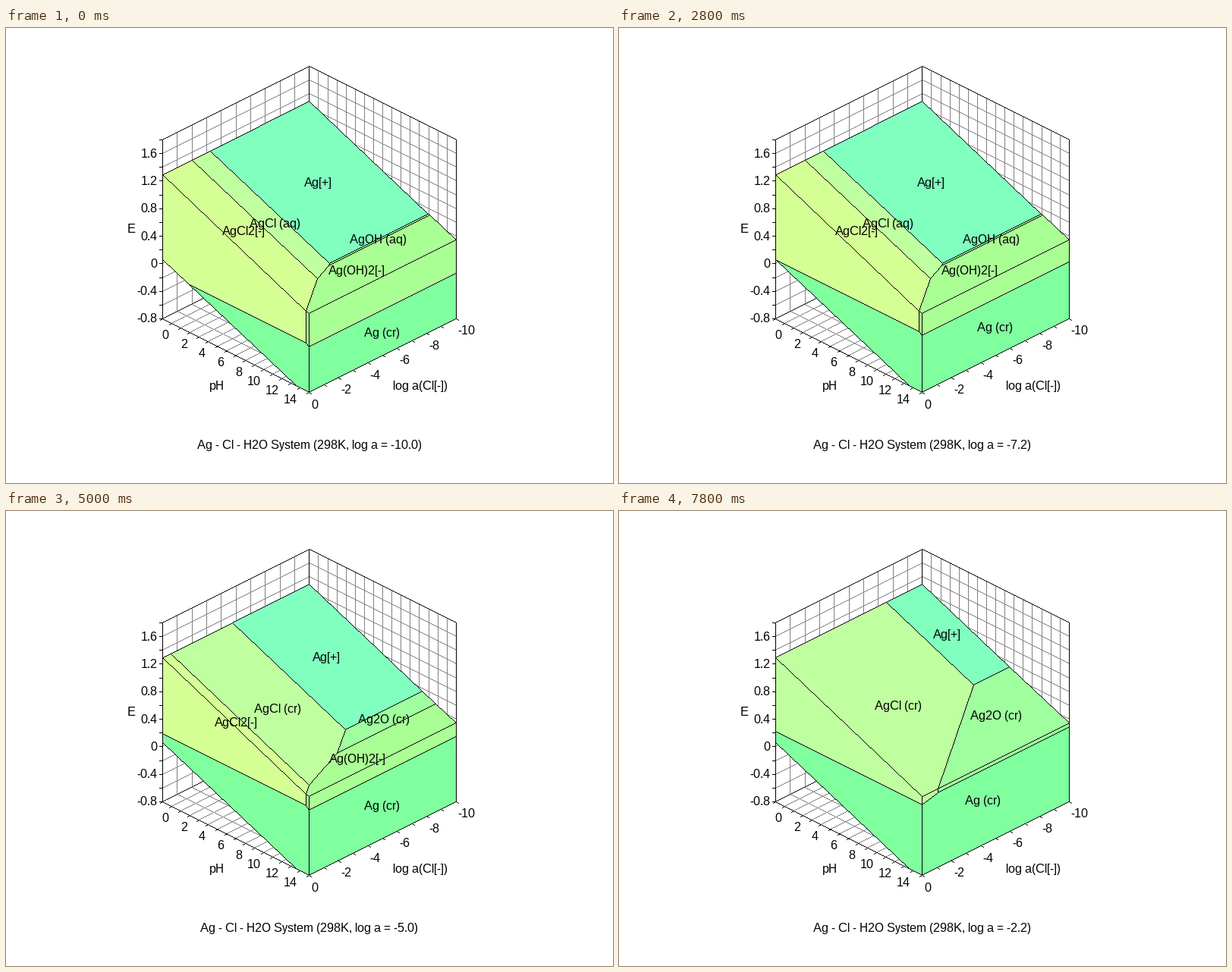
A matplotlib script for the animation above (8000 ms loop, 800x600 px).

```python
import matplotlib.pyplot as plt
import numpy as np
from matplotlib.animation import FuncAnimation
from matplotlib.collections import PolyCollection

plt.rcParams.update({
    "font.family": "Liberation Sans",
    "font.size": 12,
    "text.hinting": "native",
    "text.hinting_factor": 1,
})

W, H, DPI = 800, 600, 96
FRAMES, INTERVAL = 40, 200
NERNST = 0.05916
PH = (-1, 15)
CL = (-10, 0)
E = (-0.8, 1.8)
E_AG = 0.7996

# name: (colour, constant, weight of log a, of pH, of log Cl, of E)
# Each row gives log a(Ag+) in equilibrium with the species; the lowest wins.
SPECIES = {
    "Ag (cr)": ("#80ff9f", -E_AG / NERNST, 0, 0, 0, 1 / NERNST),
    "Ag[+]": ("#80ffbf", 0, 1, 0, 0, 0),
    "AgCl (aq)": ("#bfff9f", -3.27, 1, 0, -1, 0),
    "AgCl (cr)": ("#bfff9f", -9.75, 0, 0, -1, 0),
    "AgCl2[-]": ("#d4ff94", -5.30, 1, 0, -2, 0),
    "AgOH (aq)": ("#95ff95", 11.96, 1, -1, 0, 0),
    "Ag2O (cr)": ("#9fff9f", 6.30, 0, -1, 0, 0),
    "Ag(OH)2[-]": ("#aaff94", 24.05, 1, -2, 0, 0),
}


def project(ph, cl, e):
    u, v = (ph - PH[0]) / 16, -cl / 10
    return 206 + 193.4 * (u + v), 383 + 97 * (u - v) - 90.8 * (e - E[0])


def oxygen(ph):
    return 1.229 - NERNST * ph


def hydrogen(ph):
    return -NERNST * ph


def water_faces():
    a, b = PH
    top = [(a, 0, oxygen(a)), (a, -10, oxygen(a)),
           (b, -10, oxygen(b)), (b, 0, oxygen(b))]
    left = [(a, 0, oxygen(a)), (b, 0, oxygen(b)), (b, 0, E[0]),
            (-E[0] / NERNST, 0, E[0]), (a, 0, hydrogen(a))]
    right = [(b, 0, oxygen(b)), (b, -10, oxygen(b)), (b, -10, E[0]), (b, 0, E[0])]
    return [np.array(f, float) for f in (top, right, left)]


FACES = water_faces()


def clip(poly, const, normal):
    """Keep the part of poly where const + normal . p >= 0."""
    out = []
    for p, q in zip(poly, np.roll(poly, -1, axis=0)):
        dp, dq = const + normal @ p, const + normal @ q
        if dp >= 0:
            out.append(p)
        if dp * dq < 0:
            out.append(p + (q - p) * dp / (dp - dq))
    return np.array(out)


def region(face, name, log_a):
    def plane(key):
        _, const, k, *normal = SPECIES[key]
        return const + k * log_a, np.array(normal, float)

    c0, n0 = plane(name)
    poly = face
    for other in SPECIES:
        if other != name:
            c, n = plane(other)
            poly = clip(poly, c - c0, n - n0)
            if len(poly) < 3:
                return None
    return np.column_stack(project(*poly.T))


def snap(v):
    return np.floor(np.asarray(v) + 0.499)


def pixels(segments):
    """Whole-pixel points of one-pixel-wide, hard-edged lines."""
    dots = []
    for p, q in segments:
        p, q = snap(p), snap(q)
        n = int(abs(q - p).max())
        dots.append(snap(np.linspace(p, q, n + 1)))
    # stay off the pixel borders so that rounding is stable
    return (np.concatenate(dots) + (-0.25, 0.25)).T


fig = plt.figure(figsize=(W / DPI, H / DPI), dpi=DPI, facecolor="white")
ax = fig.add_axes([0, 0, 1, 1])
ax.set_xlim(-0.5, W - 0.5)
ax.set_ylim(H - 0.5, -0.5)
ax.axis("off")
ax.set_autoscale_on(False)


def lines(segments, color, z):
    ax.plot(*pixels(segments), ",", color=color, zorder=z)


def label(x, y, text, ha="center"):
    return ax.text(x, y, text, ha=ha, va="baseline", color="black", zorder=5)


def seg(p, q):
    return [project(*p), project(*q)]


def draw_box():
    a, b = PH
    lo, hi = E
    phs, cls, es = range(a, b + 1), range(CL[0], 1), np.arange(lo, hi + 0.01, 0.2)
    grid = [seg((p, -10, lo), (p, -10, hi)) for p in phs]
    grid += [seg((p, 0, lo), (p, -10, lo)) for p in phs]
    grid += [seg((a, c, lo), (a, c, hi)) for c in cls]
    grid += [seg((a, c, lo), (b, c, lo)) for c in cls]
    grid += [seg((a, 0, e), (a, -10, e)) for e in es]
    grid += [seg((a, -10, e), (b, -10, e)) for e in es]
    lines(grid, "#808080", 1)

    edges = [seg((a, 0, e), (a, -10, e)) for e in E]
    edges += [seg((a, -10, e), (b, -10, e)) for e in E]
    edges += [seg((p, c, lo), (p, c, hi)) for p, c in ((a, 0), (a, -10), (b, -10))]
    edges += [seg((a, 0, lo), (b, 0, lo)), seg((b, 0, lo), (b, -10, lo))]

    def tick(point, dx, dy):
        x, y = project(*point)
        edges.append([(x, y), (x + dx, y + dy)])

    for e in es:
        tick((a, 0, e), -4, 0)
    for p in phs:
        tick((p, 0, lo), -3, 2)
    for c in cls:
        tick((b, c, lo), 3, 2)
    lines(edges, "black", 2)


def draw_axis_text():
    for i in range(7):
        e = -0.8 + 0.4 * i
        text = f"{e:.1f}" if i != 2 else "0"
        label(199, project(PH[0], 0, e)[1] + 5, text, "right")
    for p in range(0, 15, 2):
        x, y = project(p, 0, E[0])
        label(x - 4, y + 20.5, str(p), "right")
    for c in range(0, -11, -2):
        x, y = project(PH[1], c, E[0])
        label(x + 2.5, y + 21, str(c), "left")
    label(165, 270, "E")
    label(277, 477, "pH")
    label(546, 477, "log a(Cl[-])")


draw_box()
draw_axis_text()
title = label(399.5, 555, "")
names = {n: label(0, 0, n) for n in SPECIES}
solid = PolyCollection([], edgecolors="none", linewidths=0, zorder=3)
ax.add_collection(solid)
outline, = ax.plot([], [], ",", color="black", zorder=4)


def draw(i):
    log_a = -10 + 0.2 * i
    title.set_text(f"Ag - Cl - H2O System (298K, log a = {log_a:.1f})")
    polys, colors = [], []
    for name, text in names.items():
        found = [region(f, name, log_a) for f in FACES]
        shown = [p for p in found if p is not None]
        polys += shown
        colors += [SPECIES[name][0]] * len(shown)
        text.set_visible(bool(shown))
        if shown:
            x, y = shown[0].mean(axis=0)
            text.set_position((x - 1.5, y + 5))
    solid.set_verts(polys)
    solid.set_facecolor(colors)
    sides = [s for p in polys for s in zip(p, np.roll(p, -1, axis=0))]
    outline.set_data(*pixels(sides))
    return [solid, outline, title, *names.values()]


anim = FuncAnimation(fig, draw, frames=FRAMES, interval=INTERVAL, repeat=True)
plt.show()
```
